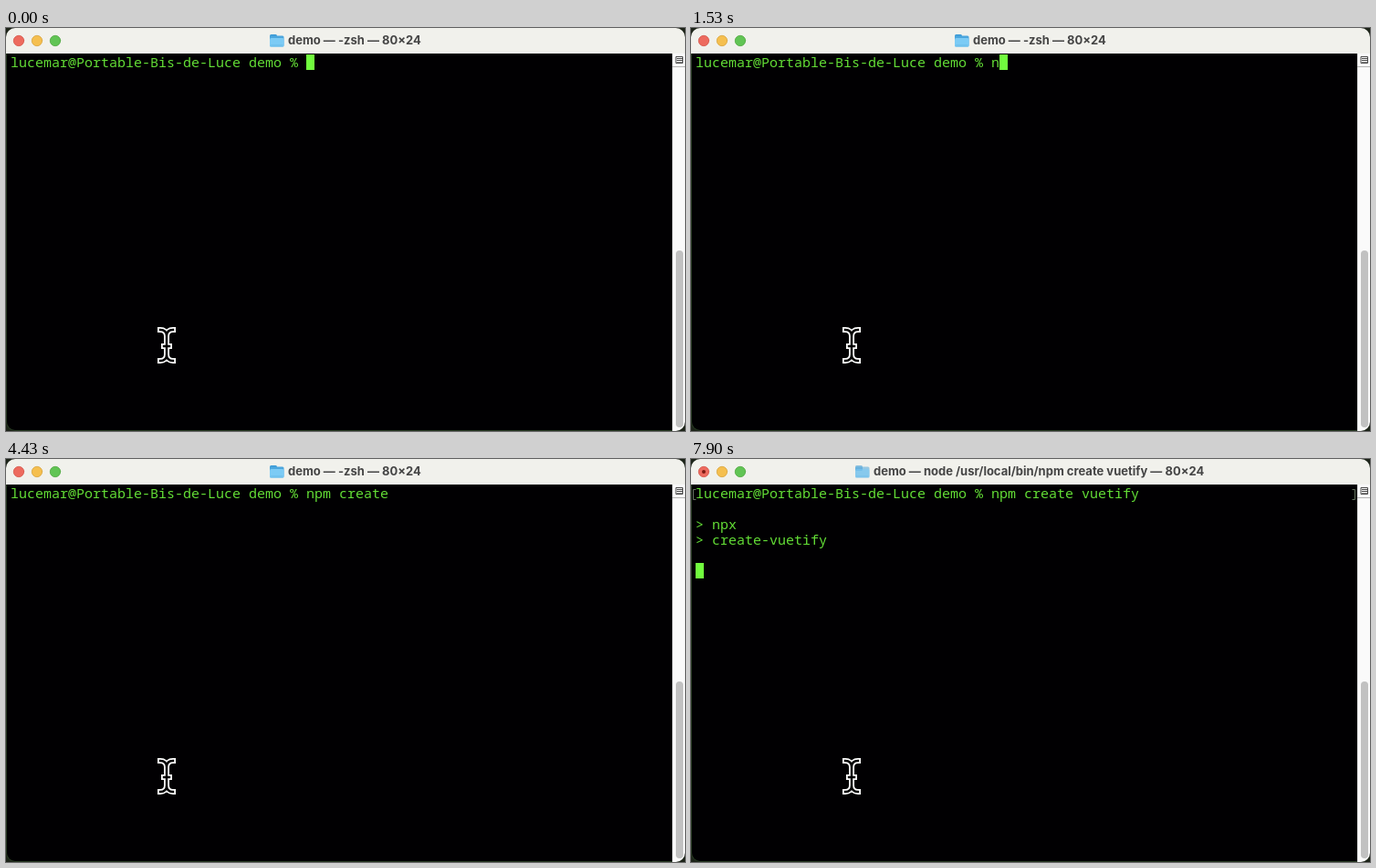
An HTML page with a canvas for the animation above (8 s loop, 744 px wide and 442 px high).

```html
<!DOCTYPE html>
<html lang="en">
<head>
<meta charset="utf-8">
<title>demo terminal</title>
<style>
html, body { margin: 0; width: 100%; height: 100%; overflow: hidden; background: #000; }
canvas { display: block; width: 744px; height: 442px; }
</style>
</head>
<body>
<canvas id="stage" width="744" height="442"></canvas>
<script>
const ctx = document.getElementById('stage').getContext('2d');
const W = 744, H = 442, LOOP = 8000;
const BAR = 28, CELL = 9, ROW = 17, LEFT = 5, TOP = 29;
const GREEN = [113, 252, 62], BLACK = [1, 0, 2];

const PROMPT = 'lucemar@Portable-Bis-de-Luce demo % ';
const COMMAND = 'npm create vuetify';
const KEYS = [1530, 2200, 2400, 2600, 2860, 3030, 3130, 3330, 3530, 3730,
  4900, 5260, 5500, 5830, 6060, 6300, 6460, 6600];
const BLINK = 700;
const BELL = 430, BELL_END = 700;
const ENTER = 6830, RUN = 6930, SPIN = 7260, OUTPUT = 7900;
const DOTS = '⠋⠙⠹⠸⠼⠴⠦⠧';

const mix = (a, b, k) => `rgb(${a.map((v, i) => Math.round(v + (b[i] - v) * k)).join()})`;

function rect(x, y, w, h, color) {
  ctx.fillStyle = color;
  ctx.fillRect(x, y, w, h);
}

function round(x, y, w, h, r, color) {
  ctx.beginPath();
  ctx.roundRect(x, y, w, h, r);
  ctx.fillStyle = color;
  ctx.fill();
}

function disc(x, y, r, color, edge) {
  ctx.beginPath();
  ctx.arc(x, y, r, 0, Math.PI * 2);
  ctx.fillStyle = color;
  ctx.fill();
  if (!edge) return;
  ctx.strokeStyle = edge;
  ctx.lineWidth = 0.8;
  ctx.stroke();
}

function write(text, col, row, color) {
  ctx.font = '300 15px "Noto Sans Mono", "DejaVu Sans Mono", monospace';
  ctx.globalAlpha = 0.88;
  ctx.fillStyle = color;
  ctx.fillText(text, LEFT + col * CELL, TOP + row * ROW + 14);
  ctx.globalAlpha = 1;
}

function block(col, row, color) {
  rect(LEFT + col * CELL, TOP + row * ROW, CELL, ROW, color);
}

function folder(x, alpha) {
  ctx.globalAlpha = alpha;
  round(x, 7, 8, 6, 1.5, '#3d9bd6');
  round(x, 8.5, 15.5, 12, 1.5, '#4ba6dd');
  round(x, 11, 15.5, 9.5, 1.5, '#7ccbf5');
  rect(x + 1, 18.6, 13.5, 0.8, '#5fb4e4');
  ctx.globalAlpha = 1;
}

function titleBar(running) {
  round(0, 0, W, BAR, [10, 10, 0, 0], '#f1f1ec');
  disc(14, 14, 5.7, '#ed6a5e', '#d5554a');
  disc(34, 14, 5.7, '#f5bf4f', '#d9a43c');
  disc(54, 14, 5.7, '#61c454', '#4fa73f');
  if (running) disc(14, 14, 2, '#7c1a12');

  const x = running ? 200 : 309;
  folder(x - 20, running ? 0.55 : 1);
  ctx.font = 'bold 13px Inter, sans-serif';
  ctx.fillStyle = '#454545';
  const job = running ? 'node /usr/local/bin/' + COMMAND : '-zsh';
  ctx.fillText(`demo — ${job} — 80×24`, x, 18);
}

function scrollBar() {
  round(730, BAR, 14, H - BAR, [0, 0, 10, 0], '#fafafa');
  rect(730, BAR, 1, H - BAR, '#e4e4e4');
  rect(730, 42, 14, 1, '#b4b4b4');
  ctx.strokeStyle = '#4a4a4a';
  ctx.lineWidth = 1;
  ctx.strokeRect(734.5, 31.5, 7, 7);
  rect(735, 33, 6, 1, '#4a4a4a');
  rect(735, 35, 6, 1, '#4a4a4a');
  rect(735, 37, 6, 1, '#8a8a8a');
  round(734, 244, 8, 194, 4, '#c1c1c1');
}

// Text pointer: one path, white outline under a black core
function pointer() {
  const beam = new Path2D(
    'M169 331C173 331 176 333 176 338V358C176 363 173 365 169 365' +
    'M183 331C179 331 176 333 176 338V358C176 363 179 365 183 365' +
    'M173 349H179');
  ctx.lineCap = 'square';
  ctx.lineJoin = 'round';
  ctx.strokeStyle = '#fff';
  ctx.lineWidth = 6;
  ctx.stroke(beam);
  ctx.strokeStyle = '#000';
  ctx.lineWidth = 2.4;
  ctx.stroke(beam);
}

function draw(t) {
  const ringing = t >= BELL && t < BELL_END;
  const flash = ringing ? 1 - (t - BELL) / (BELL_END - BELL) : 0;
  const ink = mix(GREEN, BLACK, 0.12 * flash);

  rect(0, 0, W, H, '#1c2318');
  round(0, BAR, W, H - BAR, [0, 0, 10, 10], '#263821');
  round(1, BAR, W - 1, H - BAR - 1, [0, 0, 9, 9], mix(BLACK, GREEN, 0.22 * flash));
  titleBar(t >= RUN);
  scrollBar();

  const typed = KEYS.filter(k => k <= t).length;
  write(PROMPT + COMMAND.slice(0, typed), 0, 0, ink);

  if (t < ENTER) {
    const last = typed ? KEYS[typed - 1] : BELL_END;
    if (t - last < BLINK) block(PROMPT.length + typed, 0, ink);
  } else {
    ctx.strokeStyle = '#65735f';
    ctx.lineWidth = 1;
    ctx.stroke(new Path2D('M5 33.5H2.5V44.5H5M725 33.5H727.5V44.5H725'));
    if (t < SPIN) {
      block(0, 1, ink);
    } else if (t < OUTPUT) {
      write(DOTS[Math.floor((t - SPIN) / 80)], 0, 1, ink);
      block(1, 1, ink);
    } else {
      write('> npx', 0, 2, ink);
      write('> create-vuetify', 0, 3, ink);
      block(0, 5, ink);
    }
  }
  pointer();
}

const start = performance.now();
function tick() {
  draw((performance.now() - start) % LOOP);
  requestAnimationFrame(tick);
}
tick();
</script>
</body>
</html>
```
